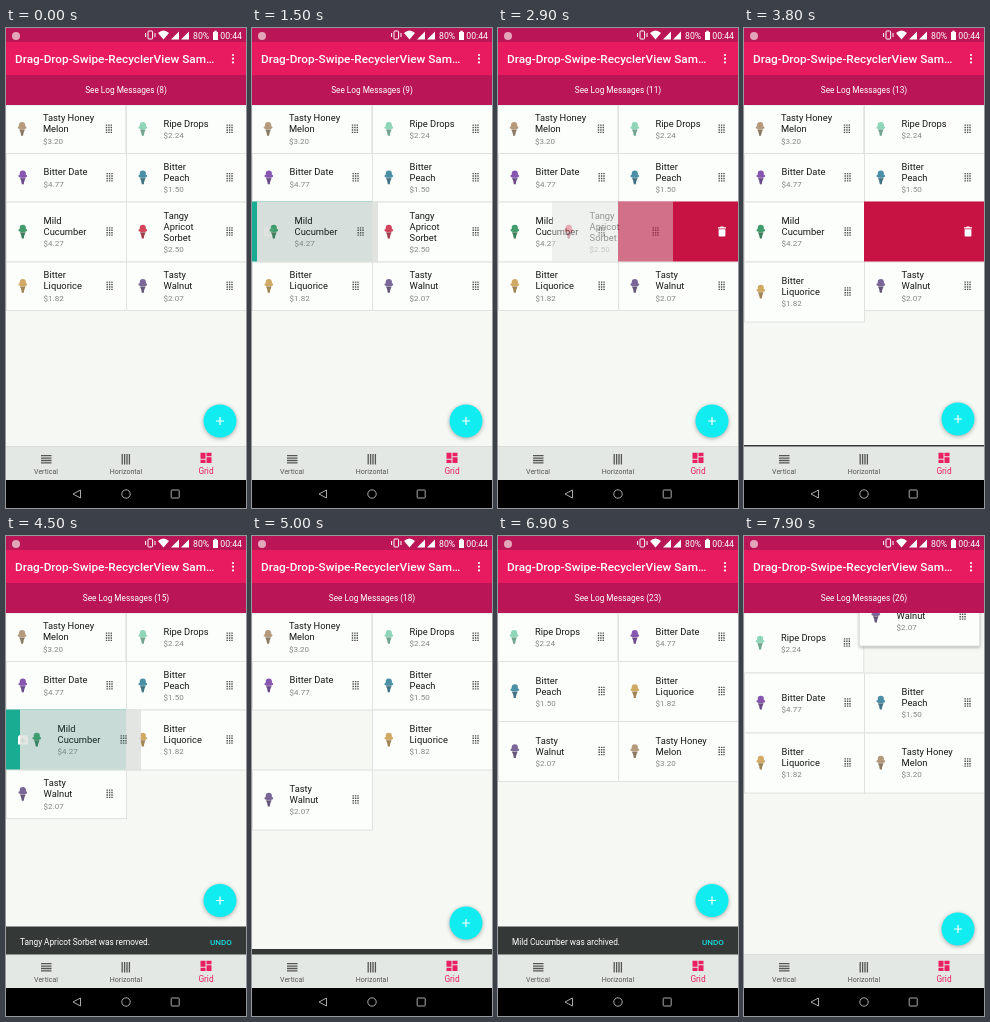
Write an HTML page that moves like this. It is 240 px wide and 480 px high and loops after 8 s.

```html
<!DOCTYPE html>
<html lang="en">
<head>
<meta charset="utf-8">
<title>Draggable grid</title>
<style>
  html, body { margin: 0; width: 100%; height: 100%; overflow: hidden; background: #f6f8f4; }
  svg { display: block; width: 100vw; height: 100vh; font-family: Roboto, "Noto Sans", sans-serif; }
  .title { font-size: 9.33px; fill: #161616; }
  .price { font-size: 8px; fill: #858585; }
  .mid { text-anchor: middle; }
  .line { fill: none; stroke: currentColor; }
  .lifted { filter: drop-shadow(0 1px 1.5px rgba(0, 0, 0, .3)); }
</style>
</head>
<body>
<svg viewBox="0 0 240 480">
  <defs>
    <clipPath id="list"><rect y="77" width="240" height="342"/></clipPath>
    <g id="cone" fill="currentColor">
      <circle cy="-3.6" r="3.1"/>
      <ellipse cy="-1.3" rx="4.4" ry="1.8"/>
      <path d="M-2.8 .9H2.8L1.6 3.6 .9 7H-.9L-1.6 3.6Z"/>
      <path d="M-2.8 .6H2.8L1.6 3.6 .9 7H-.9L-1.6 3.6Z" fill="#333" opacity=".3"/>
    </g>
    <path id="grip" fill="none" stroke="#4c4c4c" stroke-width="1.4" stroke-dasharray="1.4 1"
      d="M-3.1-3.6h6.2M-3.1-1.2h6.2M-3.1 1.2h6.2M-3.1 3.6h6.2"/>
  </defs>

  <rect width="240" height="480" fill="#f6f8f4"/>
  <g clip-path="url(#list)"><g id="cells"></g></g>

  <!-- header -->
  <rect width="240" height="14" fill="#ba1656"/>
  <rect y="14" width="240" height="33" fill="#e81b60"/>
  <rect y="47" width="240" height="30" fill="#ba1656"/>
  <circle cx="10" cy="8" r="4" fill="#e3a5ba"/>
  <g fill="#fff">
    <rect x="142" y="3" width="4.6" height="8" rx=".8" class="line" color="#fff"/>
    <path d="M139.6 5v4M149 5v4" stroke="#fff"/>
    <path d="M152 5Q157.5 0 163 5L157.5 11.5Z"/>
    <path d="M165 11.5h8v-8ZM175 11.5h8v-8Z"/>
    <path d="M207 4h1.3V2.8h2.4V4H212v8h-5Z"/>
    <g font-size="8.7"><text x="187" y="10.6">80%</text><text x="214.3" y="10.6">00:44</text></g>
    <text x="9" y="35" font-size="11.8" font-weight="500">Drag-Drop-Swipe-RecyclerView Sam…</text>
    <circle cx="227" cy="27" r="1.1"/><circle cx="227" cy="30.7" r="1.1"/><circle cx="227" cy="34.4" r="1.1"/>
    <text id="log" class="mid" x="120" y="65" font-size="8.25"></text>
  </g>

  <g id="snack">
    <rect y="419" width="240" height="30" fill="#343837"/>
    <text id="message" x="14" y="437" font-size="8.25" fill="#fff"></text>
    <text x="204" y="437" font-size="8.1" font-weight="500" fill="#14dfe2">UNDO</text>
  </g>

  <g id="fab">
    <circle cx="214" cy="393" r="16.5" fill="#10ecf0" style="filter:drop-shadow(0 1.5px 2px rgba(0,0,0,.32))"/>
    <path d="M210 393h8M214 389v8" stroke="#fff" stroke-width="1.2"/>
  </g>

  <!-- bottom bar -->
  <rect y="418.4" width="240" height="1" fill="#c9cdca"/>
  <rect y="419" width="240" height="33" fill="#e3e8e5"/>
  <g color="#555" fill="#555" font-size="7.05" class="mid">
    <path class="line" stroke-width="1.3" d="M35 427.7h10.5M35 430.1h10.5M35 432.5h10.5M35 434.9h10.5"/>
    <path class="line" stroke-width="1.3" d="M116.2 426v10.5M118.6 426v10.5M121 426v10.5M123.4 426v10.5"/>
    <text x="40" y="446">Vertical</text>
    <text x="120" y="446">Horizontal</text>
    <g fill="#e91e63">
      <path d="M194.5 424.7h5v6h-5ZM200.5 424.7h5v3.5h-5ZM194.5 431.7h5v3.3h-5ZM200.5 429.2h5v5.8h-5Z"/>
      <text x="200" y="446" font-size="8.3">Grid</text>
    </g>
  </g>
  <rect y="452" width="240" height="28"/>
  <g class="line" color="#aaa">
    <path d="M74.5 462v8L67 466Z"/>
    <circle cx="120" cy="466" r="4.2"/>
    <rect x="165.2" y="462" width="8" height="8" rx=".6"/>
  </g>
</svg>

<script>
const LOOP = 8000, STEP = 100, TOP = 76.5, HALF = 120, MOVE = 250;

const items = {
  honey: ['Tasty Honey|Melon', '$3.20', '#b59a7c'],
  drops: ['Ripe Drops', '$2.24', '#8fd6b8'],
  date: ['Bitter Date', '$4.77', '#8656b0'],
  peach: ['Bitter|Peach', '$1.50', '#4a8fa6'],
  cucumber: ['Mild|Cucumber', '$4.27', '#429c6c'],
  tangy: ['Tangy|Apricot|Sorbet', '$2.50', '#d2455c'],
  liquorice: ['Bitter|Liquorice', '$1.82', '#d0a964'],
  walnut: ['Tasty|Walnut', '$2.07', '#7a6798'],
};

// start time, delay before neighbours move, order of the grid
const states = [
  [0, 0, 'honey drops date peach cucumber tangy liquorice walnut'],
  [3700, 120, 'honey drops date peach cucumber liquorice walnut'],
  [4900, 120, 'honey drops date peach liquorice walnut'],
  [6000, 0, 'drops date honey peach liquorice walnut'],
  [6250, 0, 'drops date peach liquorice honey walnut'],
  [6500, 0, 'drops date peach liquorice walnut honey'],
  [7300, 0, 'drops date walnut peach liquorice honey'],
  [7600, 0, 'drops walnut date peach liquorice honey'],
].map(([start, delay, order]) => ({ start, delay, order: order.split(' ') }));

const swipes = [
  { id: 'cucumber', x: 0, fill: '#1aab93', until: 2300,
    path: [[1400, 0], [1500, 5], [1700, 30], [1900, 58], [2000, 62], [2100, 45], [2200, 16], [2300, 0]] },
  { id: 'tangy', x: HALF, fill: '#c71344', until: 3900,
    path: [[2600, 0], [2700, -12], [2900, -66], [3200, -86], [3500, -100], [3700, -120]] },
  { id: 'cucumber', x: 0, fill: '#1aab93', until: 4900,
    path: [[4400, 0], [4500, 14], [4600, 50], [4700, 95], [4800, 120]] },
];

const drags = [
  { id: 'honey', path: [[5700, 0, 76.5], [5800, 1, 80], [6000, 4, 115], [6250, 15, 170],
    [6500, 80, 191], [6700, 118, 187], [6800, 120, 185]] },
  { id: 'walnut', path: [[6900, 0, 185], [7000, 1, 183], [7300, 10, 140], [7500, 45, 105],
    [7700, 85, 74], [7900, 115, 49.5]] , open: true },
];

const snackRise = [[3700, 0], [3800, 2], [3900, 16], [4000, 25], [4100, 28.5], [4600, 28.5], [4700, 26],
  [4800, 13], [4900, 0], [5000, 6], [5100, 19], [5200, 25.5], [5300, 27.8], [5400, 28.5],
  [7100, 28.5], [7200, 25], [7300, 12], [7400, 2], [7500, 0]];

const logTimes = [1500, 2400, 2700, 3600, 3700, 4100, 4500, 4700, 4800, 4900,
  5800, 6000, 6300, 6500, 6800, 7000, 7300, 7600];

const $ = id => document.getElementById(id);

function make(tag, attrs, parent, text = '') {
  const el = document.createElementNS('http://www.w3.org/2000/svg', tag);
  for (const key in attrs) el.setAttribute(key, attrs[key]);
  el.textContent = text;
  if (parent) parent.append(el);
  return el;
}

const shift = (el, x, y) => el.setAttribute('transform', `translate(${x} ${y})`);
const mix = (a, b, k) => a + (b - a) * k;
const clamp = v => Math.max(0, Math.min(1, v));
const ease = k => k < .5 ? 2 * k * k : 1 - 2 * (1 - k) ** 2;

// linear interpolation in rows of [time, ...values]
function sample(rows, t) {
  const next = rows.findIndex(row => row[0] > t);
  if (next < 0) return rows[rows.length - 1].slice(1);
  if (next === 0) return rows[0].slice(1);
  const a = rows[next - 1], b = rows[next], k = (t - a[0]) / (b[0] - a[0]);
  return a.slice(1).map((v, i) => mix(v, b[i + 1], k));
}

// a row is as tall as its tallest cell, and cells keep a height once stretched
const heights = {};
for (const id in items) heights[id] = items[id][0].split('|').length > 2 ? 60 : 48.5;
for (const state of states) {
  state.slots = {};
  let y = TOP;
  for (let i = 0; i < state.order.length; i += 2) {
    const row = state.order.slice(i, i + 2);
    const h = Math.max(...row.map(id => heights[id]));
    row.forEach((id, col) => {
      heights[id] = h;
      state.slots[id] = { x: col ? HALF : i ? 0 : -.7, y, h };
    });
    y += h;
  }
}

const cells = {};
for (const id in items) {
  const [name, price, color] = items[id], lines = name.split('|');
  const root = make('g', {});
  const box = make('rect', { x: .5, y: .5, width: HALF, stroke: '#dfe2de' }, root);
  const body = make('g', {}, root);
  make('use', { href: '#cone', color, x: 16.8 }, body);
  make('use', { href: '#grip', x: 103.6 }, body);
  const first = 3.3 - 5.3 * lines.length;
  lines.forEach((line, i) => make('text', { class: 'title', x: 37.6, y: first + 10.8 * i }, body, line));
  make('text', { class: 'price', x: 37.6, y: first + 10.8 * lines.length + .5 }, body, price);
  cells[id] = { root, box, body };
}

for (const swipe of swipes) {
  swipe.back = make('g', {});
  make('rect', { x: swipe.x, y: 173.5, width: HALF, height: 60, fill: swipe.fill }, swipe.back);
  const icon = swipe.x
    ? 'M220 199.3h2l.7-.8h2.6l.7.8h2v1.2h-8ZM220.6 201.2h6.8v6.2q0 1.1-1.1 1.1h-4.6q-1.1 0-1.1-1.1Z'
    : 'M13 199.2h8l1 1.8v7.5h-10v-7.5ZM16.2 202.2v2h-2l2.8 2.8 2.8-2.8h-2v-2Z';
  make('path', { d: icon, fill: '#fff', 'fill-rule': 'evenodd' }, swipe.back);
}

function draw(t) {
  const at = states.filter(s => s.start <= t).length - 1;
  const now = states[at], before = states[at - 1] || now;
  const swipe = swipes.find(s => t > s.path[0][0] && t < s.until);
  const drag = drags.find(d => t > d.path[0][0] && (d.open || t < d.path[d.path.length - 1][0]));
  const k = ease(clamp((t - now.start - now.delay) / MOVE));
  const layers = [];

  for (const id of now.order) {
    const { root, box, body } = cells[id], to = now.slots[id], from = before.slots[id];
    let x = mix(from.x, to.x, k), y = mix(from.y, to.y, k), alpha = 1;
    const dragged = drag && drag.id === id, swiped = swipe && swipe.id === id;
    if (dragged) [x, y] = sample(drag.path, t);
    if (swiped) {
      const [dx] = sample(swipe.path, t);
      x += dx;
      alpha = 1 - Math.abs(dx) / HALF;
    }
    shift(root, x, y);
    shift(body, 0, to.h / 2);
    box.setAttribute('height', to.h);
    box.setAttribute('fill', swiped ? '#e0e2e0' : '#fcfefb');
    root.setAttribute('opacity', alpha);
    root.setAttribute('class', dragged ? 'lifted' : '');
    if (!dragged && !swiped) layers.push(root);
  }
  if (swipe) layers.push(swipe.back);
  const active = (swipe || drag || {}).id;
  if (now.order.includes(active)) layers.push(cells[active].root);
  $('cells').replaceChildren(...layers);

  const [rise] = sample(snackRise, t);
  shift($('snack'), 0, -rise);
  shift($('fab'), 0, -rise);
  $('message').textContent = t < 4900 ? 'Tangy Apricot Sorbet was removed.' : 'Mild Cucumber was archived.';
  $('log').textContent = `See Log Messages (${8 + logTimes.filter(time => time <= t).length})`;
}

const begin = performance.now();
let shown = -1;
function tick() {
  const t = Math.floor((performance.now() - begin) % LOOP / STEP) * STEP;
  if (t !== shown) draw(shown = t);
  requestAnimationFrame(tick);
}
tick();
</script>
</body>
</html>
```
